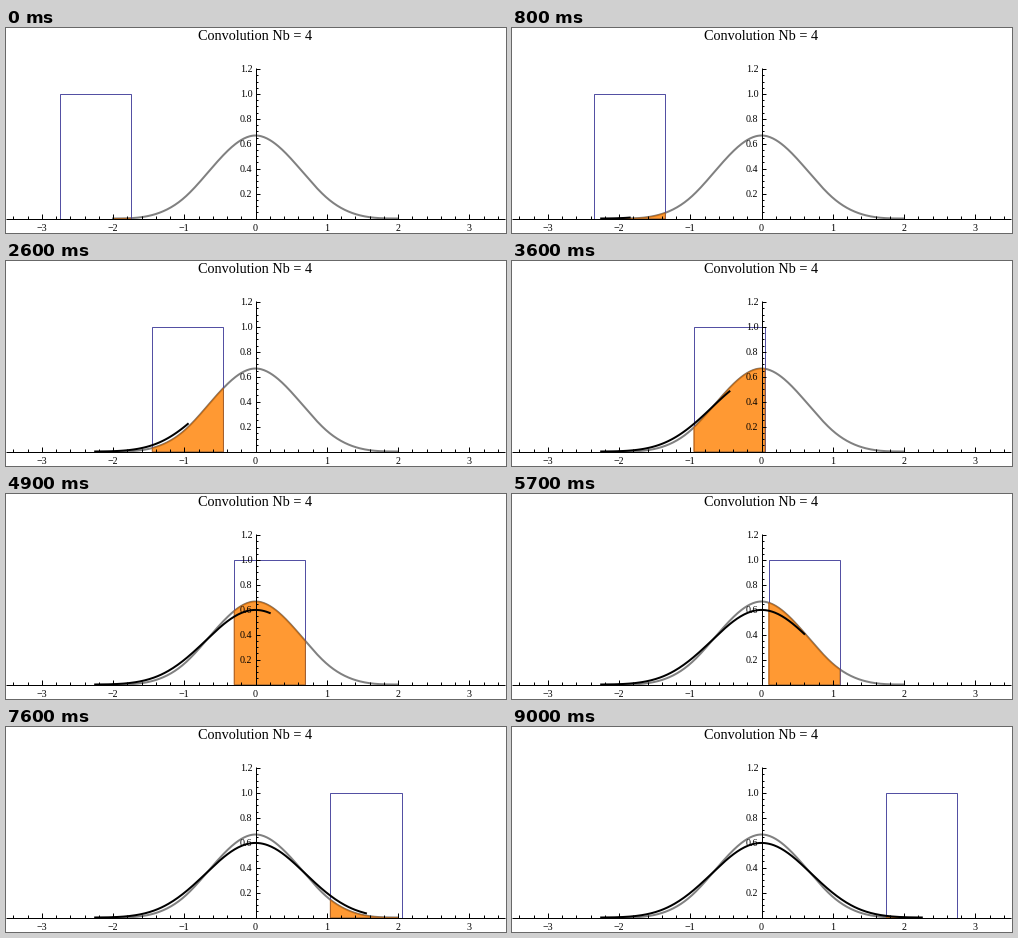
Write a matplotlib script that moves like this. It is 500 px wide and 205 px high and loops after 9.1 s.

```python
import numpy as np
import matplotlib.pyplot as plt
from math import comb, factorial
from matplotlib.animation import FuncAnimation

W, H, DPI = 500, 205, 80
PX = 72 / DPI                # one pixel in points
X0, Y0 = 249.5, 190.5        # origin of the plot in pixels
SX, SY = 71.25, 124.5        # pixels per unit
FRAMES, STEP, START = 91, 0.05, -2.25

plt.rcParams["font.family"] = "Liberation Serif"


def px(x):
    return X0 + SX * np.asarray(x, float)


def py(y):
    return Y0 - SY * np.asarray(y, float)


def bspline(x, n):
    """Centred box function convolved with itself, n boxes in all."""
    x = np.asarray(x, float)
    total = sum((-1) ** k * comb(n, k) * np.maximum(n / 2 - np.abs(x) - k, 0) ** (n - 1)
                for k in range(n + 1))
    return total / factorial(n - 1)


fig = plt.figure(figsize=(W / DPI, H / DPI), dpi=DPI, facecolor="white")
ax = fig.add_axes([0, 0, 1, 1])
ax.set_xlim(0, W)
ax.set_ylim(H, 0)
ax.axis("off")


def rule(xs, ys):
    ax.plot(xs, ys, color="black", lw=PX, zorder=6, solid_capstyle="butt", snap=True)


def label(x, y, text, size=10, **kw):
    ax.text(x, y, text, fontsize=size * PX, zorder=7, color="black", **kw)


def draw_axes():
    rule([0, 499], [Y0, Y0])
    rule([X0, X0], [Y0, py(1.2) - 0.6])
    for i in range(-17, 18):
        x = px(i / 5)
        major = i % 5 == 0
        rule([x, x], [Y0, Y0 - (5 if major else 3)])
        if major:
            label(x, 203, str(i // 5).replace("-", "\u2212"), ha="center", va="baseline")
    for i in range(1, 25):
        y = py(i / 20)
        major = i % 4 == 0
        rule([X0, X0 + (4.5 if major else 2.5)], [y, y])
        if major:
            label(246.3, y + 3.4, f"{i / 20:.1f}", ha="right", va="baseline")
    label(X0, 12, "Convolution Nb = 4", 14.3, ha="center", va="baseline")


draw_axes()
u = np.linspace(-2, 2, 301)
ax.plot(px(u), py(bspline(u, 4)), color="0.5", lw=2 * PX, zorder=1)
box, = ax.plot([], [], color=(0.25, 0.24, 0.6), lw=0.9 * PX, zorder=2,
               solid_joinstyle="miter")
area, = ax.fill([0, 0, 0], [0, 0, 0], fc=(1, 0.5, 0, 0.8), ec=(0.68, 0.38, 0.1, 0.8),
                lw=PX, zorder=3)
trace, = ax.plot([], [], color="black", lw=2 * PX, zorder=4)


def update(i):
    c = START + STEP * i
    a, b = c - 0.5, c + 0.5
    box.set_data(px([a, a, b, b]), py([0, 1, 1, 0]))

    lo, hi = max(a, -2), min(b, 2)
    s = np.linspace(lo, hi, 100)
    xs = np.concatenate([[lo], s, [hi]])
    ys = np.concatenate([[0], bspline(s, 4), [0]])
    area.set_xy(np.column_stack([px(xs), py(ys)]))

    t = np.linspace(START, c, 2 + 3 * i)
    trace.set_data(px(t), py(bspline(t, 5)))
    return box, area, trace


anim = FuncAnimation(fig, update, frames=FRAMES, interval=100, repeat=True, repeat_delay=0)
plt.show()
```
